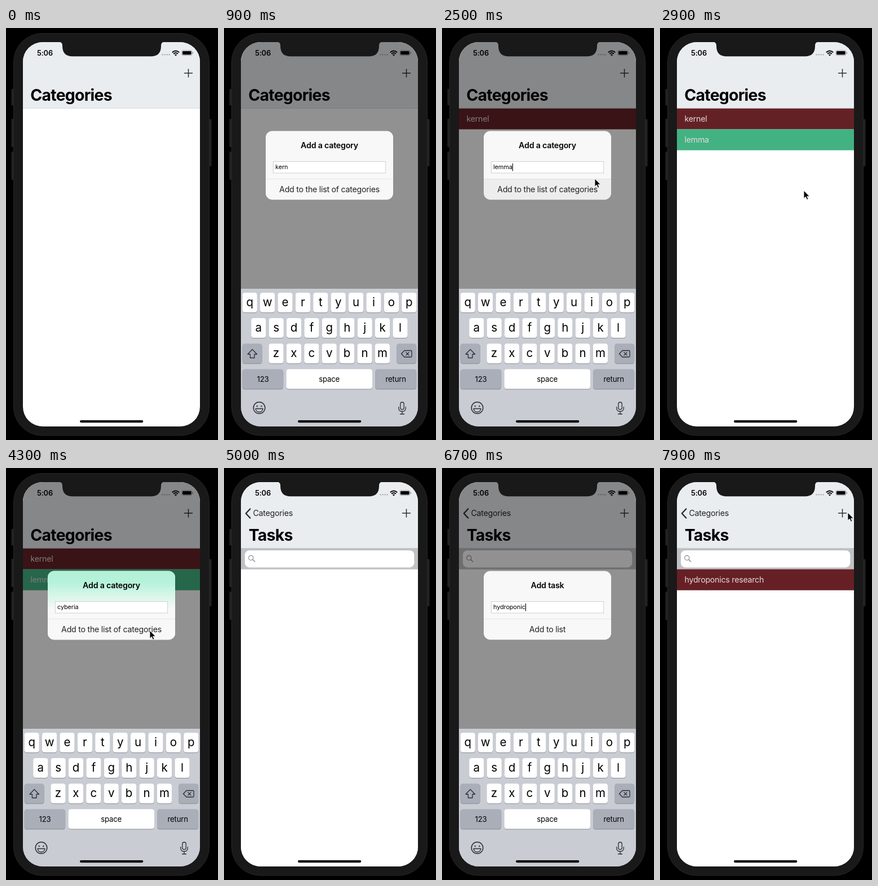
Animation, 376 px wide and 730 px high, one loop 8000 ms. Source, as an HTML page:

```html
<!DOCTYPE html>
<html lang="en">
<head>
<meta charset="utf-8">
<title>Categories</title>
<style>
html, body { margin: 0; width: 100%; height: 100%; overflow: hidden; background: #000; }
svg { display: block; width: 100vw; height: 100vh; font-family: Inter, Roboto, sans-serif; }
.big { font-size: 28.4px; font-weight: 700; letter-spacing: -.75px; }
.body { font-size: 14.2px; letter-spacing: -.25px; }
.bold { font-size: 14.2px; font-weight: 600; letter-spacing: -.2px; }
.small { font-size: 10.9px; letter-spacing: -.1px; }
.key { font-size: 20.5px; }
.label { font-size: 13.2px; letter-spacing: -.2px; }
.mid { text-anchor: middle; }
.line { fill: none; stroke: #2b2d30; stroke-linecap: round; stroke-linejoin: round; }
</style>
</head>
<body>
<svg id="stage" viewBox="0 0 376 730" xmlns="http://www.w3.org/2000/svg"></svg>
<script>
const LOOP = 8000, STEP = 100;

const rect = (x, y, w, h, fill, r = 0, more = "") =>
  `<rect x="${x}" y="${y}" width="${w}" height="${h}" rx="${r}" fill="${fill}" ${more}/>`;
const text = (x, y, cls, str, more = "") =>
  `<text x="${x}" y="${y}" class="${cls}" ${more}>${str}</text>`;
const line = (d, width, more = "") =>
  `<path class="line" d="${d}" stroke-width="${width}" ${more}/>`;
const row = (id, y, fill, str) =>
  `<g id="${id}">${rect(30, y, 314, 37.2, fill)}${text(43.5, y + 24, "body", str, 'fill="#e2dada"')}</g>`;

function keyCap(x, y, w, fill = "#fff") {
  return rect(x, y + 1, w, 35, "#898c92", 4.2) + rect(x, y, w, 35, fill, 4.2);
}

function keyRow(letters, x, y) {
  return [...letters].map((c, i) => {
    const kx = x + i * 31.4;
    return keyCap(kx, y, 26.2) + text(kx + 13.1, y + 24, "key mid", c);
  }).join("");
}

function keyboard() {
  const grey = "#a9aeb9";
  return rect(30, 462, 314, 244, "#c9ccd3") +
    keyRow("qwertyuiop", 32.6, 469) + keyRow("asdfghjkl", 48.2, 514) + keyRow("zxcvbnm", 79.4, 559.3) +
    keyCap(32.6, 559.3, 35, grey) + keyCap(306.2, 559.3, 35, grey) +
    line("M50.2 569.5L58.5 578H54V584.5H46.400V578H42Z", 1.3) +
    line("M320 571.500H331.500Q333 571.500 333 573V581.500Q333 583 331.500 583H320L314.500 577.200ZM322.800 574.600L328 579.900M328 574.600L322.800 579.900", 1.3) +
    keyCap(32.6, 604.6, 72.600, grey) + keyCap(110.4, 604.6, 152.6) + keyCap(268.2, 604.6, 73, grey) +
    text(69, 627, "label mid", "123") + text(186.700, 627, "label mid", "space") + text(304.700, 627, "label mid", "return") +
    `<circle class="line" cx="62.500" cy="673" r="10.300" stroke-width="1.500" stroke="#50555c"/>
     <circle cx="58.700" cy="670" r="1.500" fill="#50555c"/><circle cx="66.300" cy="670" r="1.500" fill="#50555c"/>` +
    line("M56 674.500H69Q68 680.500 62.500 680.500T56 674.500Z", 1.3) +
    `<rect class="line" x="312.800" y="663" width="6.400" height="13" rx="3.200" stroke-width="1.300"/>` +
    line("M309.800 671.500V673.500Q309.800 679.500 316 679.500T322.200 673.500V671.500M316 679.500V684M312.500 684H319.500", 1.3);
}

function statusBar() {
  const dots = [0, 1, 2, 3].map(i => `<circle cx="${277.6 + i * 4}" cy="47.300" r="1.300" fill="#000" opacity=".25"/>`);
  return text(55, 48.7, "", "5:06", 'font-size="12.800" font-weight="600" letter-spacing="-.15"') + dots.join("") +
    `<g fill="none" stroke="#000" stroke-width="1.900">
       <path d="M294.800 43.200Q301 37.800 307.200 43.200"/><path d="M297.100 45.700Q301 42.300 304.900 45.700"/>
     </g><path d="M298.800 47.400Q301 45.500 303.200 47.400L301 49.400Z"/>` +
    rect(311.8, 39.8, 18, 8.6, "none", 2.4, 'stroke="#000" stroke-opacity=".4" stroke-width=".8"') +
    rect(313, 41, 15.6, 6.2, "#000", 1.4) + rect(330.6, 42.700, 1.1, 2.8, "#777", .5);
}

function alertBox() {
  return `<g id="alert">` + rect(74, 182.5, 226, 121.7, "#f8f8f8", 11.5) +
    rect(74, 182.5, 226, 121.7, "url(#mint)", 11.5, 'id="tint"') +
    `<path id="press" d="M74 267.500H300V292.700Q300 304.200 288.500 304.200H85.500Q74 304.200 74 292.700Z" fill="#000" opacity=".045"/>` +
    text(187, 213, "bold mid", "", 'id="heading"') +
    rect(87.3, 236.4, 199.4, 20.6, "#fff", 0, 'stroke="#c6c6c8" stroke-width=".8"') +
    text(91, 250.2, "small", "", 'id="field"') + rect(0, 240, 1.2, 13.5, "#111", 0, 'id="caret"') +
    rect(74, 267, 226, .6, "#d9d9db") + text(187, 291, "body mid", "", 'id="action" fill="#222"') + `</g>`;
}

const stage = document.getElementById("stage");
stage.innerHTML = `
<defs>
  <clipPath id="screen">${rect(30, 25, 314, 681, "#fff", 35)}</clipPath>
  <linearGradient id="mint" x1="0" y1="0" x2="0" y2="1">
    <stop offset="0" stop-color="#b4f0d8"/><stop offset=".16" stop-color="#b4f2da"/>
    <stop offset=".34" stop-color="#d4f6e8"/><stop offset=".56" stop-color="#f8f8f8"/>
  </linearGradient>
</defs>` +
  rect(0, 0, 376, 730, "#000") +
  [[9.5, 108, 29], [9.5, 161, 50], [9.5, 219, 50], [359, 161.5, 83.5]]
    .map(([x, y, h]) => rect(x, y, 5.5, h, "#222", 1.2)).join("") +
  rect(13.5, 9.5, 347, 712.5, "#191919", 51, 'stroke="#272727"') +
  `<g clip-path="url(#screen)">` +
  rect(30, 25, 314, 681, "#fff") +
  `<g id="cats">` + row("kernel", 142.3, "#642125", "kernel") + row("lemma", 179.4, "#42b283", "lemma") +
  row("cyberia", 216.500, "#7b62a8", "cyberia") + `</g>
  <g id="tasks">` + rect(30, 142, 314, 564, "#fff") + rect(30, 142, 314, 37.6, "#c0c1c4") +
  rect(37, 146, 300.3, 30.2, "#fff", 8) +
  `<circle cx="47.800" cy="159.200" r="4.100" fill="none" stroke="#808287" stroke-width="1.100"/>` +
  line("M50.900 162.300L54.700 166", 1.2, 'style="stroke:#808287"') + row("task", 179.4, "#662025", "hydroponics research") + `</g>` +
  rect(30, 25, 314, 117, "#e9edf0") + rect(30, 141.8, 314, .7, "#c3c7ca") +
  line("M316.500 80H330.500M323.500 73V87", 1.5) +
  text(43.3, 129, "big", "Categories", 'id="catTitle"') + text(43.700, 129, "big", "Tasks", 'id="taskTitle"') +
  `<g id="back">` + line("M46.300 72.500L38.800 80.500L46.300 88.500", 2.4) + text(51.5, 85.400, "body", "Categories", 'fill="#222"') + `</g>` +
  statusBar() + rect(30, 25, 314, 681, "#000", 0, 'id="dim"') + alertBox() +
  `<g id="keys">${keyboard()}</g>` + rect(131, 695, 112.3, 4.2, "#000", 2.1) + `</g>
  <path d="M94 24.500Q100 25 100 31V32Q100 50.200 118 50.200H257Q275 50.200 275 32V31Q275 25 281 24.500Z" fill="#191919"/>
  <path id="mouse" d="M0 0V14.200L3.300 11.100L5.500 16.200L7.900 15.200L5.700 10.200H10.200Z" stroke="#fff" stroke-width=".9"/>`;

const $ = {};
stage.querySelectorAll("[id]").forEach(n => $[n.id] = n);

const category = ["Add a category", "Add to the list of categories"];
const task = ["Add task", "Add to list"];
const alerts = [
  { open: 300, close: 1400, from: 500, to: 1000, value: "kernel", words: category },
  { open: 2000, close: 2700, from: 2150, to: 2450, value: "lemma", words: category },
  { open: 3400, close: 4500, from: 3750, to: 4200, value: "cyberia", words: category },
  { open: 5800, close: 7400, from: 6350, to: 7000, value: "hydroponics research", words: task }
];
const rowTimes = { kernel: 1500, lemma: 2800, cyberia: 4600, task: 7600 };

// Pointer trips: [time, x, y]; it is out of sight between trips.
const trips = [
  [[200, 312, 110], [300, 322, 80], [500, 322, 80]],
  [[1000, 300, 262], [1200, 255, 288], [1400, 255, 288], [1600, 316, 170]],
  [[1900, 316, 110], [2000, 322, 80], [2200, 322, 80]],
  [[2400, 284, 252], [2500, 271, 267], [2600, 255, 288], [2900, 255, 288], [3300, 322, 80], [3500, 322, 80]],
  [[4100, 300, 250], [4300, 255, 288], [4500, 255, 288], [4700, 200, 162], [4800, 200, 162], [5000, 358, 240]],
  [[5400, 346, 130], [5600, 322, 80], [6200, 322, 80], [6400, 298, 100]],
  [[7200, 290, 260], [7300, 215, 288], [7500, 215, 288], [7900, 333, 79]]
];

const clamp = v => Math.max(0, Math.min(1, v));
const ease = v => v * v * (3 - 2 * v);
const ramp = (t, a, b) => ease(clamp((t - a) / (b - a)));
const set = (id, name, v) => $[id].setAttribute(name, v);
const show = (id, on) => set(id, "visibility", on ? "inherit" : "hidden");

function pointer(t) {
  const trip = trips.find(p => t >= p[0][0] && (t < p.at(-1)[0] || p === trips.at(-1)));
  if (!trip) return null;
  const i = trip.findIndex(p => p[0] >= t);
  if (i < 1) return (i ? trip.at(-1) : trip[0]).slice(1);
  const [a, b] = [trip[i - 1], trip[i]], k = ramp(t, a[0], b[0]);
  return [a[1] + (b[1] - a[1]) * k, a[2] + (b[2] - a[2]) * k];
}

function drawAlert(t) {
  const a = alerts.find(a => t > a.open && t < a.close + 200);
  ["alert", "dim", "keys"].forEach(id => show(id, a));
  if (!a) return;
  const enter = ramp(t, a.open, a.open + 200), leave = ramp(t, a.close, a.close + 200);
  const on = enter * (1 - leave), scale = 1 + .15 * (1 - enter);
  set("alert", "opacity", on);
  set("alert", "transform", `translate(187 243.300) scale(${scale}) translate(-187 -243.300)`);
  set("dim", "opacity", .43 * on);
  set("keys", "transform", `translate(0 ${244 * (1 - on)})`);
  $.heading.textContent = a.words[0];
  $.action.textContent = a.words[1];
  $.field.textContent = a.value.slice(0, Math.floor(a.value.length * clamp((t - a.from) / (a.to - a.from))));
  set("caret", "x", 91 + $.field.getComputedTextLength());
  show("caret", (t / STEP) % 5 < 3);
  show("press", t >= a.close - 200 + (a.value === "cyberia" ? 100 : 0) && t < a.close);
  show("tint", a.value === "cyberia");
}

function draw(time) {
  const t = Math.floor(time % LOOP / STEP) * STEP;
  const push = ramp(t, 4800, 5000);
  set("cats", "transform", `translate(${-94 * push} 0)`);
  set("tasks", "transform", `translate(${314 * (1 - push)} 0)`);
  show("tasks", push > 0);
  set("catTitle", "opacity", 1 - push);
  set("taskTitle", "opacity", push);
  set("back", "opacity", push);
  for (const id in rowTimes) show(id, t >= rowTimes[id]);
  drawAlert(t);
  const p = pointer(t);
  show("mouse", p);
  if (p) set("mouse", "transform", `translate(${p[0]} ${p[1]})`);
}

const start = performance.now();
function tick() {
  draw(performance.now() - start);
  requestAnimationFrame(tick);
}
draw(0);
tick();
</script>
</body>
</html>
```
